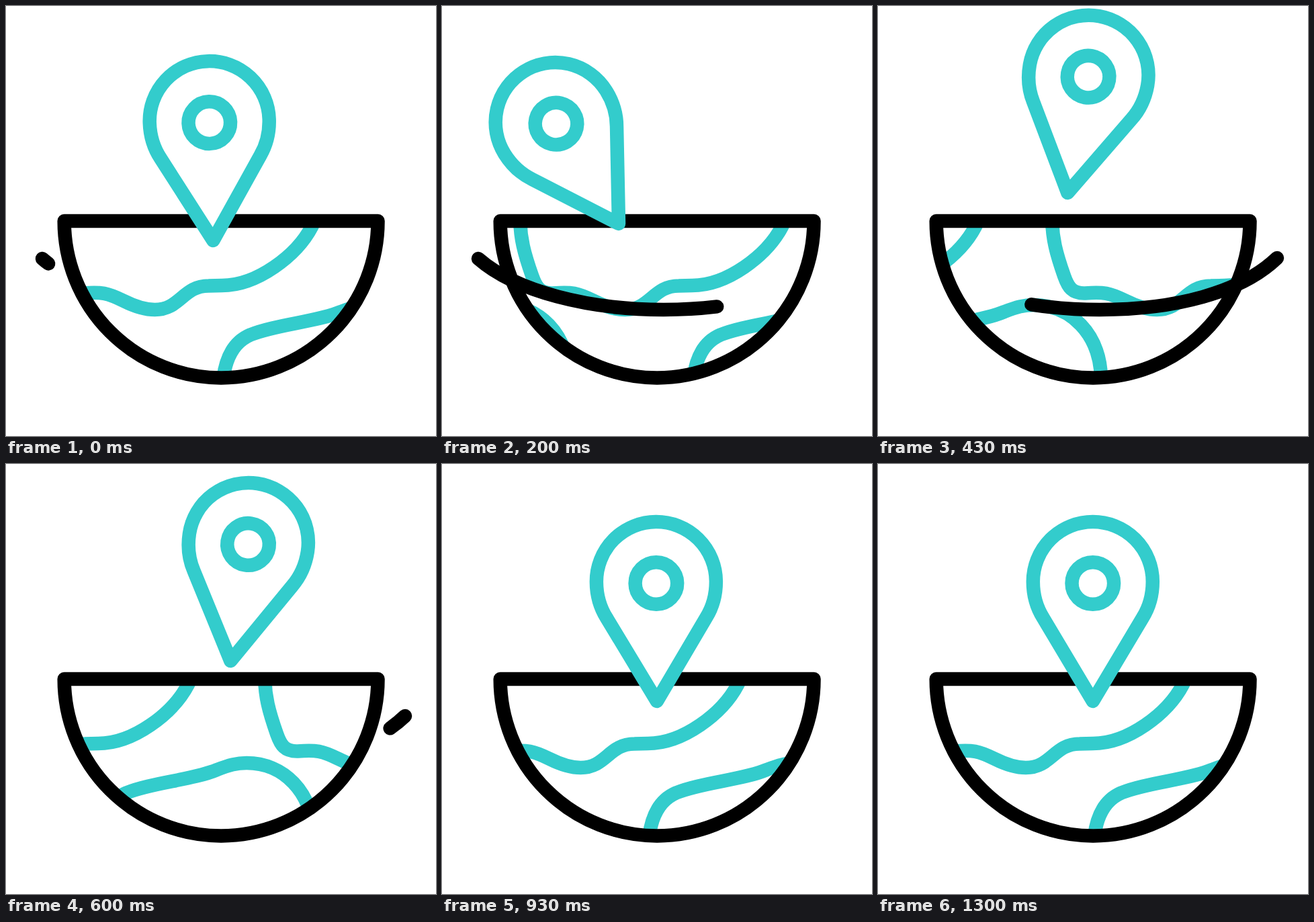
Write an HTML page that moves like this. It is 640 px wide and 640 px high and loops after 1.67 s.

```html
<!DOCTYPE html>
<html lang="en">
<head>
<meta charset="utf-8">
<title>Bowl and map pin</title>
<style>
  html, body { margin: 0; height: 100%; overflow: hidden; background: #fff; }
  svg { display: block; width: 100%; height: 100%; }
  path, circle { fill: none; stroke: #000; stroke-width: 20.5; stroke-linecap: round; stroke-linejoin: round; }
  .teal * { stroke: #3cc; }
  #pin path { fill: #fff; }
</style>
</head>
<body>
<svg viewBox="0 0 640 640">
  <defs>
    <path id="bowl" d="M86.7 320H553.5A233.4 233.4 0 0 1 320.1 553.4A233.4 233.4 0 0 1 86.7 320Z"/>
    <clipPath id="inside"><use href="#bowl"/></clipPath>
    <g id="rivers" class="teal">
      <path d="M64 316C64 345 70 368 82 402C88 419 94 428 113 427.5C140 425 150 427 174 439C192 448 207 452 220 452C258 452 262 416.5 300 416.5L320 416C372 416 431 372 454 328L460 314"/>
      <path d="M322 554C326 522 338 500 362 489.5C400 474 462 470 497 455C515 448 526 445 541 445C595 445 640 487 641 556"/>
    </g>
  </defs>
  <g clip-path="url(#inside)">
    <g id="land">
      <use href="#rivers"/>
      <use href="#rivers" x="-504"/>
    </g>
  </g>
  <use href="#bowl"/>
  <g id="pin" class="teal">
    <path d="M0 0L-74-124C-84-140-89-158-89-178A89 89 0 0 1 89-178C89-158 84-140 74-124Z"/>
    <circle cy="-175.5" r="31.3"/>
  </g>
  <path id="swoosh" pathLength="1" d="M54 376C110 425 219 452 330 452S540 427 594 375"/>
</svg>
<script>
const LOOP = 1670, FPS = 30, LAST = 40, LAND_WIDTH = 504;
const [land, pin, swoosh] = ['land', 'pin', 'swoosh'].map(id => document.getElementById(id));

// step, tip x, tip y, tilt in degrees
const PIN_KEYS = [
  [0, 319.8, 353, 0],
  [1, 308.3, 349, -1.8],
  [7, 263, 324, -32],
  [14, 282.3, 278, 10.1],
  [16, 303, 272.5, 11],
  [19, 334.3, 293, 8.6],
  [23, 329.4, 335, -6],
  [26, 322.3, 350.5, -4],
  [29, 319.8, 353, -0.3],
  [34, 319.8, 353, 3.5],
  [LAST, 319.8, 353, 0]
];

// Symmetric cubic-bezier(.4, 0, .6, 1) between two steps
function ease(step, from, to) {
  const x = Math.min(1, Math.max(0, (step - from) / (to - from)));
  let s = x;
  for (let i = 0; i < 5; i++) {
    s -= (s * (1.2 - 0.6 * s + 0.4 * s * s) - x) / (1.2 * (1 - s + s * s));
  }
  return s * s * (3 - 2 * s);
}

function slope(i, column) {
  const [a, b, c] = [PIN_KEYS[i - 1], PIN_KEYS[i], PIN_KEYS[i + 1]];
  if (!c) return 0;
  const after = (c[column] - b[column]) / (c[0] - b[0]);
  if (!a) return after;
  const before = (b[column] - a[column]) / (b[0] - a[0]);
  return (before * (c[0] - b[0]) + after * (b[0] - a[0])) / (c[0] - a[0]);
}

// Smooth Hermite curve through the keys
function pinValue(step, column) {
  const i = Math.max(1, PIN_KEYS.findIndex(key => key[0] >= step));
  const [a, b] = [PIN_KEYS[i - 1], PIN_KEYS[i]];
  const span = b[0] - a[0], u = (step - a[0]) / span, v = 1 - u;
  return v * v * (1 + 2 * u) * a[column] + u * u * (1 + 2 * v) * b[column]
    + span * u * v * (v * slope(i - 1, column) - u * slope(i, column));
}

function draw(now) {
  const step = Math.min(LAST, Math.floor((now % LOOP + 3.4) * FPS / 1000) + 1);

  land.setAttribute('transform', `translate(${LAND_WIDTH * ease(step, -0.2, 32.7)})`);

  const [x, y, tilt] = [1, 2, 3].map(column => pinValue(step, column));
  pin.setAttribute('transform', `translate(${x} ${y}) rotate(${tilt})`);

  const head = ease(step, -0.2, 12), tail = ease(step, 9.6, 20.7);
  swoosh.style.display = tail < 1 ? '' : 'none';
  swoosh.style.strokeDasharray = `${head - tail} 2`;
  swoosh.style.strokeDashoffset = -tail;
}

const start = performance.now();
function tick() {
  draw(performance.now() - start);
  requestAnimationFrame(tick);
}
tick();
</script>
</body>
</html>
```
